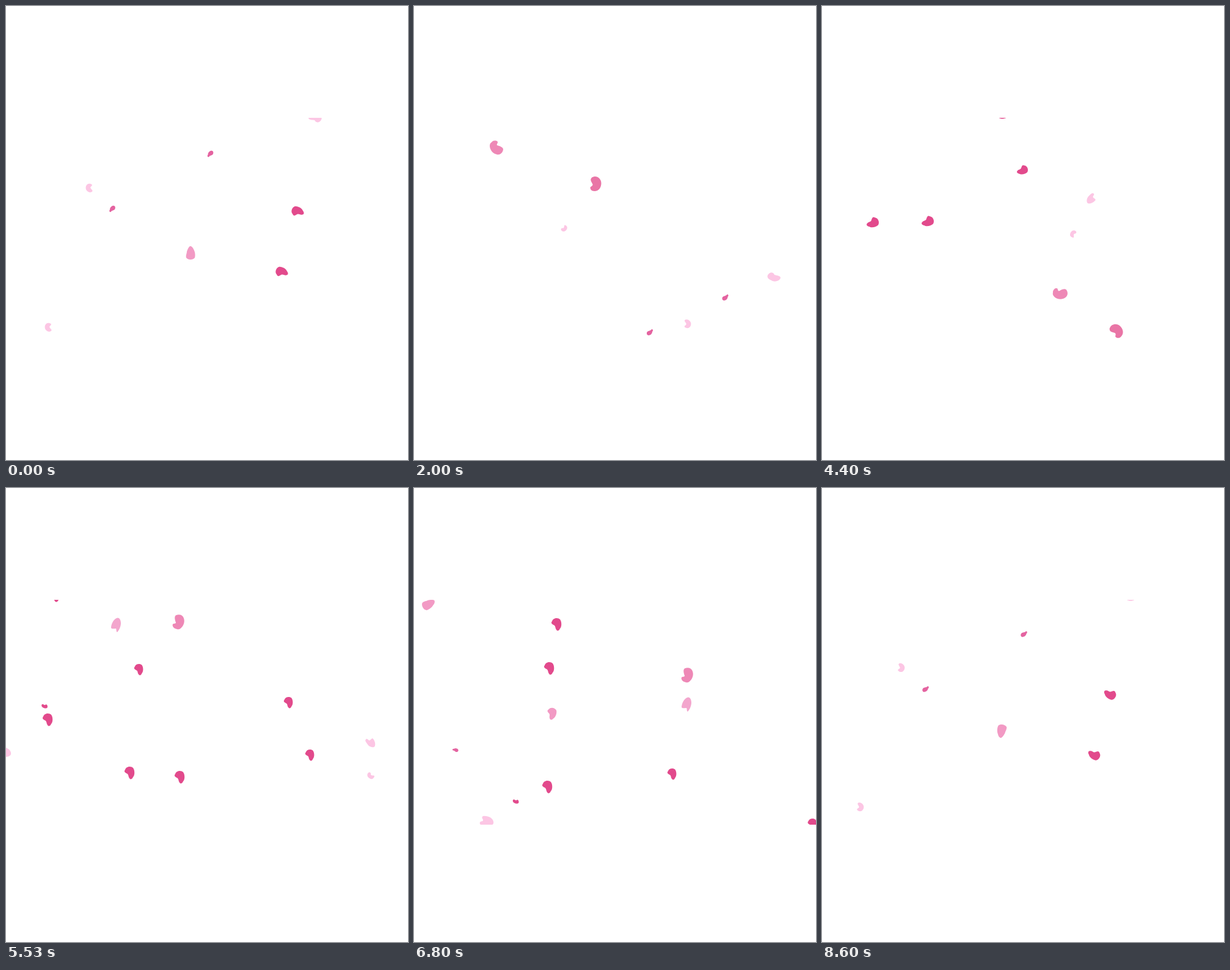
Write an HTML page with a canvas that moves like this. It is 658x743 px and loops after 8630 ms.

```html
<!DOCTYPE html>
<html>
<head>
<meta charset="utf-8">
<title>Falling petals</title>
<style>
html, body { margin: 0; width: 100%; height: 100%; overflow: hidden; background: #fff; }
canvas { display: block; }
</style>
</head>
<body>
<canvas id="stage" width="658" height="743"></canvas>
<script>
const ctx = document.getElementById('stage').getContext('2d');
const LOOP = 8630, CYCLE = 8.64;

// Key times in seconds; the last ones run past the seam of the loop.
const TIMES = [0, 2, 3.52, 4.4, 5.52, 6.8, 8.6, 8.64, 10.64];
// All petals share one spin, in degrees at the key times.
const SPIN = [175, 0, -315, -405, -485, -845, -1075, -1265];

const ROSE = '#e24a8c', BERRY = '#e463a0', CORAL = '#e975a6', PINK = '#ee88b6',
      MALLOW = '#f29ac4', LILAC = '#f3a6cd', BLUSH = '#fcc6e4';

const SHAPES = {
  drop: 'M-7-5C-5-11 3-11 6-8C9-4 9 4 6 7C5 10 2 12 0 9C-2 7-1 4-3 2C-6 0-10-1-7-5Z',
  boot: 'M-8-9C-5-13 2-12 2-9C2-7 0-6 1-4C5-3 11-1 11 3C10 9 5 12 1 11C-6 10-11 3-11-3C-11-6-10-8-8-9Z',
  bean: 'M-5-11C1-14 9-9 9-1C9 6 5 12-2 12C-7 12-9 9-9 6C-8 4-5 4-5 1C-6-2-9-5-8-8C-7-10-6-11-5-11Z',
  pear: 'M-2-10C0-13 4-9 5-6C8-1 8 5 7 8C4 12-4 12-7 8C-8 4-6 1-6-2C-5-5-4-8-2-10Z',
  leaf: 'M1-11C4-13 8-10 8-3C8 3 5 9 2 12C0 11 1 7 0 6C-3 6-7 7-8 5C-8-1-4-9 1-11Z',
  kidney: 'M-4-6C0-8 5-4 5 0C5 5 1 8-3 6C-6 5-5 3-3 2C-1 0-3-1-4-3C-5-4-5-5-4-6Z',
  shoe: 'M-8-6C-5-9 0-8 1-4C4-3 11-3 11 1C9 7 0 8-4 5C-10 3-13-2-8-6Z',
  shell: 'M-6-8C2-9 10-5 11 1C12 6 8 8 0 8C-6 8-13 7-11 2C-9-1-6 2-6-2C-7-4-9-6-6-8Z',
  heart: 'M-7-6C-5-8-3-3-1-4C1-5 2-8 4-7C7-4 9 2 7 6C4 9-3 6-5 2C-7-1-10-4-7-6Z',
  chip: 'M-4-5C-2-7 1-5 0-2C1 0 4-1 6 0C6 4 2 6 0 5C-4 4-8-1-4-5Z',
  seed: 'M3-5C5-5 6-3 4-1C4 2 1 5-2 5C-5 5-6 1-4-1C-2-3 1-2 3-5Z',
  speck: 'M-4-3C-2-4 0-1 1-2C3-4 5-2 5 1C5 4 1 4-1 3C-4 2-6-1-4-3Z'
};

const petals = [];
// Each flight: index of its first key time, then x, y at that and the following times.
function add(shape, color, base, scale, ...flights) {
  const path = new Path2D(SHAPES[shape]);
  for (const [first, ...points] of flights)
    petals.push({ path, color, base, scale, first, points });
}

add('boot', PINK, 0, 1,
  [1, 135, 232, 295, 384, 390, 470],
  [4, 282, 219, 447, 306]);
add('bean', CORAL, 0, 1, [1, 297.5, 291, 403, 454, 482.5, 531]);
add('leaf', LILAC, -125, 1, [4, 180, 224, 446, 354]);
add('pear', MALLOW, 175, 1, [5, 24, 190, 294, 398, 302, 404, 630, 650]);
add('drop', MALLOW, -145, 0.95, [4, -5, 177, 225, 369]);
add('kidney', BLUSH, 0, 1.08,
  [5, -140, 110, 130, 294, 136, 298, 448, 520],
  [5, -190, 360, 63, 522, 69, 526, 370, 720]);
add('shoe', BLUSH, 0, 1, [5, 420, -60, 503, 178, 506, 183, 589, 444]);
add('shell', BLUSH, -125, 1, [4, -3, 432, 119, 545]);
add('heart', BLUSH, -125, 1, [2, 316, 237, 440, 315, 596.5, 417]);
add('chip', BLUSH, -125, 1, [2, 265, 296, 411, 373, 597, 471]);
add('chip', BLUSH, 85, 0.9, [1, 246, 364, 459, 575]);
add('seed', BERRY, 0, 1,
  [5, 180, 30, 330.5, 239, 334.5, 242, 509.5, 477],
  [5, -25, 150, 169.5, 329, 174, 332, 386, 534]);
add('seed', BERRY, 0, 0.8, [4, -60, 300, 68, 429]);
add('speck', ROSE, -125, 1, [4, 63, 357, 166.5, 513]);
add('drop', ROSE, -125, 1,
  [2, 87, 260, 173, 352, 284, 473],
  [2, -11, 253, 83, 354, 202, 466],
  [4, 68, 379, 218, 489],
  [4, 80, 176, 221, 295, 446, 436, 451, 436, 720, 590],
  [4, 90, 105, 233, 223, 472, 337, 477, 337, 735, 480]);
add('drop', ROSE, -125, 0.9,
  [3, 51, 130, 217, 297, 422, 468],
  [2, 197, 134, 328, 268, 497, 437],
  [3, 296, 177, 462, 351]);

// Key segment at time t and the part of it passed; ends are extrapolated.
function locate(t, first, count) {
  let i = 0;
  while (i < count - 2 && t >= TIMES[first + i + 1]) i++;
  const start = TIMES[first + i];
  return [i, (t - start) / (TIMES[first + i + 1] - start)];
}

const mix = (a, b, k) => a + (b - a) * k;

function drawPetal({ path, color, base, scale, first, points }, t, spin) {
  const [i, k] = locate(t, first, points.length / 2);
  const x = mix(points[2 * i], points[2 * i + 2], k);
  const y = mix(points[2 * i + 1], points[2 * i + 3], k);
  if (x < -20 || x > 678 || y < 160 || y > 575) return;
  ctx.save();
  ctx.translate(x, y);
  ctx.rotate((spin - base) * Math.PI / 180);
  ctx.scale(scale, scale);
  ctx.fillStyle = color;
  ctx.fill(path);
  ctx.restore();
}

// Five pictures in every 200 ms, the first one held longer.
function stepTime(ms) {
  const part = ms % 200;
  const step = [70, 100, 130, 170].filter(v => part >= v).length;
  return (Math.floor(ms / 200) * 5 + step) * 0.04;
}

function draw() {
  const t = stepTime(performance.now() % LOOP);
  const [i, k] = locate(t, 0, SPIN.length);
  const spin = mix(SPIN[i], SPIN[i + 1], k);
  ctx.clearRect(0, 0, 658, 743);
  ctx.save();
  ctx.beginPath();
  ctx.rect(0, 183, 658, 368);
  ctx.clip();
  for (const petal of petals) {
    drawPetal(petal, t, spin);
    drawPetal(petal, t + CYCLE, spin);
  }
  ctx.restore();
  requestAnimationFrame(draw);
}
draw();
</script>
</body>
</html>
```
